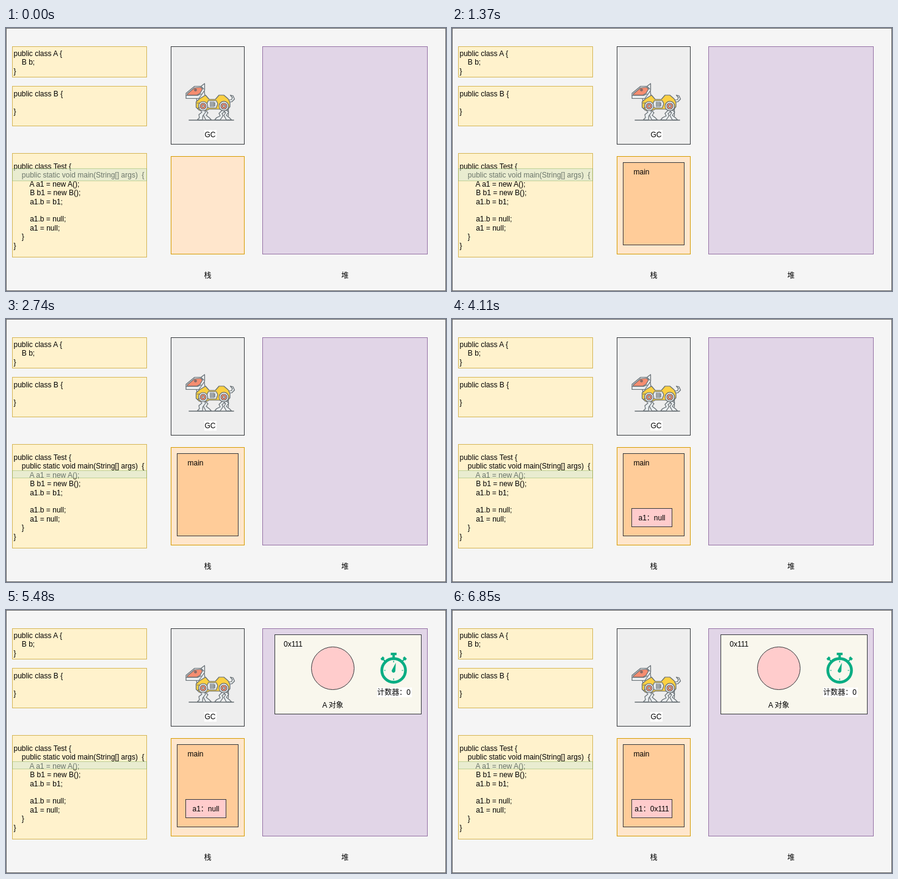
An HTML page for the animation above (8000 ms loop, 721x431 px).

```html
<!DOCTYPE html>
<html lang="zh-CN">
<head>
<meta charset="utf-8">
<title>GC</title>
<style>
html, body { margin: 0; width: 100%; height: 100%; overflow: hidden; background: #f5f5f5; }
svg { display: block; }
text { font: 12px "Liberation Sans", "Noto Sans CJK SC", "Noto Sans CJK", sans-serif; white-space: pre; fill: #000; }
.mid { text-anchor: middle; }
.dark { stroke: #36393d; }
.code { fill: #fff2cc; stroke: #d6b656; }
.mark { fill: #d5e8d4; stroke: #82b366; opacity: .5; }
.ink { stroke: #656d72; stroke-width: 1.2; stroke-linejoin: round; stroke-linecap: round; }
.pale { fill: #e9edef; }
.gold { fill: #fbd043; }
.coral { fill: #f58d70; }
</style>
</head>
<body>
<svg width="721" height="431" viewBox="0 0 721 431">
  <rect x=".5" y=".5" width="720" height="430" fill="#f5f5f5" stroke="#666"/>

  <g class="code">
    <rect x="10.5" y="30.5" width="220" height="50"/>
    <rect x="10.5" y="95.5" width="220" height="65"/>
    <rect x="10.5" y="205.5" width="220" height="170"/>
  </g>
  <g id="listing"></g>

  <rect class="dark" x="270.5" y="30.5" width="120" height="160" fill="#eee"/>
  <rect x="270.5" y="210.5" width="120" height="160" fill="#ffe6cc" stroke="#d79b00"/>
  <rect x="420.5" y="30.5" width="270" height="340" fill="#e1d5e7" stroke="#9673a6"/>

  <!-- robot dog -->
  <g class="ink" fill="none">
    <path d="M300 151H373" stroke-width="1.6"/>
    <path class="pale" d="M365 121L370 121L374.500 116.500L372 111L367.500 110L371 114L369.500 117.500L364 118Z"/>
    <path class="pale" d="M326 134L331 139L328 143L333 147L336.500 150.500H327.500L323.500 143L325 139L320 134Z"/>
    <path class="pale" d="M354 135L349 140L351 144L345 147L342 150.500H351L355.500 144L354 140L361 136Z"/>
    <path class="pale" d="M317 133L321 138L316 142L317 147L313.500 150.500H322L322.500 144L327 138L324 133Z"/>
    <path class="pale" d="M360 133L365 138L361 143L366 147L369.500 150.500H361L357 143L360 139L355 134Z"/>
    <path class="pale" d="M312 115L317 109L325 103L326 112L319 119L313 122Z"/>
    <path class="gold" d="M311.500 121L317 116L327 110L333 117H343L349 110H357L364 116L367 122V129L362 135L349 133H333L329 135H317L311.500 130Z"/>
    <path class="pale" d="M331.500 119H344.500L347 124L344.500 131H331.500L329 125Z"/>
    <path d="M335 121V129M337.500 121V129M340 121V129M342 122V128" stroke="#4e565a"/>
    <circle class="pale" cx="323" cy="128" r="7.500"/>
    <circle class="coral" cx="323" cy="128" r="4.800"/>
    <circle class="pale" cx="323" cy="128" r="1.800"/>
    <circle class="pale" cx="357" cy="128" r="7.800"/>
    <circle class="coral" cx="357" cy="128" r="5"/>
    <circle class="pale" cx="357" cy="128" r="1.900"/>
    <path d="M313 123H317M314 132L317 130M364.500 128V144"/>
    <path class="pale" d="M295 107L309 95.500H319.500L325.500 91V102L320 110L316 115.500H295Z"/>
    <path class="coral" d="M297 108L309 98L319 97L322 100L318 107L313 110H297Z"/>
    <path d="M295 110.500H314L320 108M320 96L324 100"/>
    <circle cx="310.500" cy="101.500" r="1.700" fill="#c65d46"/>
  </g>
  <rect x="325" y="167" width="20" height="16" fill="#fff"/>
  <text class="mid" x="334.500" y="179">GC</text>
  <text class="mid" x="330.500" y="410">栈</text>
  <text class="mid" x="555.500" y="410">堆</text>

  <rect id="line1" class="mark" x="10.500" y="230.500" width="220" height="20"/>
  <rect id="line2" class="mark" x="10.500" y="248.500" width="220" height="12"/>

  <g id="stack">
    <rect class="dark" x="280.500" y="220.500" width="100" height="135" fill="#fc9"/>
    <text x="297.500" y="240">main</text>
  </g>
  <g id="local">
    <rect class="dark" x="294.500" y="310.500" width="66" height="30" fill="#fcc"/>
    <text id="value" class="mid" x="327.500" y="330"></text>
  </g>
  <g id="object">
    <rect class="dark" x="440.500" y="40.500" width="240" height="130" fill="#f9f7ed"/>
    <circle class="dark" cx="535.500" cy="95.500" r="35" fill="#fcc"/>
    <text x="455" y="60">0x111</text>
    <text class="mid" x="535.500" y="160">A 对象</text>
    <!-- stopwatch -->
    <g stroke="#09ad83" fill="none">
      <circle cx="635.200" cy="99" r="19.400" stroke-width="4.600"/>
      <path d="M630.500 72H640M635.200 72V79" stroke-width="4"/>
      <path d="M615 81.500L619 77.500M651.500 77.500L655.500 81.500" stroke-width="4"/>
      <path d="M617 79.500L621 84M653.500 79.500L649.500 84" stroke-width="2"/>
      <path d="M638.800 86.500L638 100A3 3 0 1 1 632.500 98Z" fill="#09ad83" stroke="none"/>
      <path d="M635.200 83V86M635.200 112V115M619.500 99H622M648.500 99H651" stroke-width="1.200"/>
    </g>
    <rect x="608" y="127" width="57" height="16" fill="#fff"/>
    <text class="mid" x="635.500" y="139">计数器：0</text>
  </g>
</svg>
<script>
const $ = id => document.getElementById(id);
const LOOP = 8000, STEP = 1370;

function addCode(top, lines) {
  lines.forEach((line, i) => {
    const t = document.createElementNS("http://www.w3.org/2000/svg", "text");
    t.setAttribute("x", 12.5);
    t.setAttribute("y", top + Math.round(i * 14.4));
    t.textContent = line;
    $("listing").append(t);
  });
}

addCode(46, ["public class A {", "    B b;", "}"]);
addCode(112, ["public class B {", "", "}"]);
addCode(231, [
  "public class Test {",
  "    public static void main(String[] args)  {",
  "        A a1 = new A();",
  "        B b1 = new B();",
  "        a1.b = b1;",
  "",
  "        a1.b = null;",
  "        a1 = null;",
  "    }",
  "}"
]);

// first and last step in which each part is visible
const shown = { line1: [0, 1], line2: [2, 5], stack: [1, 5], local: [3, 5], object: [4, 5] };
let current = -1;

function show(step) {
  if (step === current) return;
  current = step;
  for (const [id, [from, to]] of Object.entries(shown))
    $(id).style.display = step >= from && step <= to ? "" : "none";
  $("value").textContent = "a1：" + (step < 5 ? "null" : "0x111");
}

const start = performance.now();
function tick() {
  const time = (performance.now() - start) % LOOP;
  show(Math.min(5, Math.floor(time / STEP)));
  requestAnimationFrame(tick);
}
tick();
</script>
</body>
</html>
```
